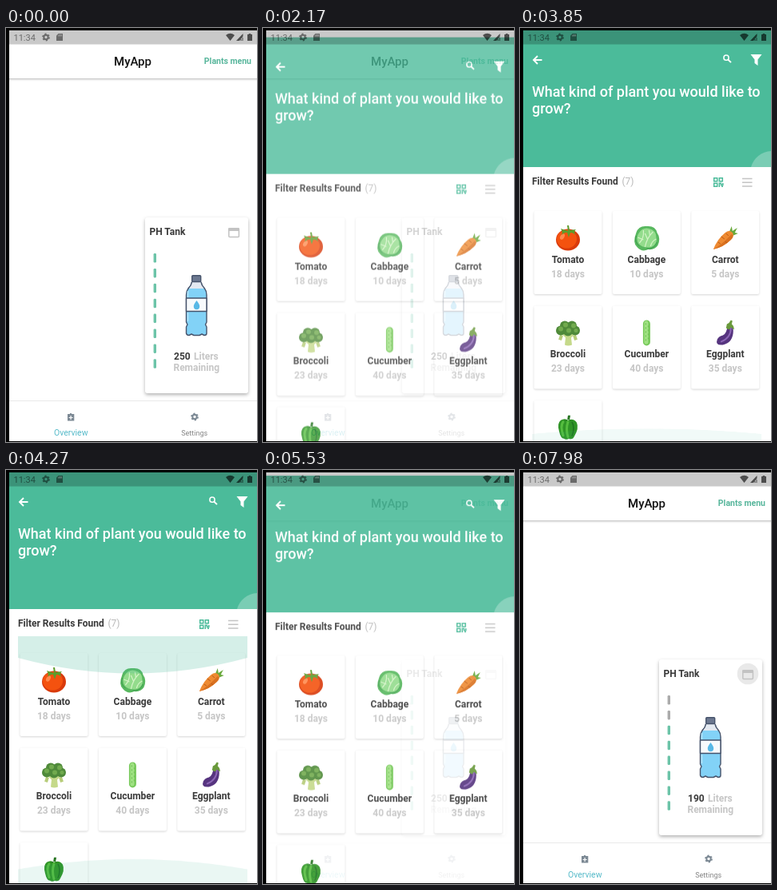
Animation, 314 px wide and 518 px high, one loop 8000 ms. Source, as an HTML page:

```html
<!DOCTYPE html>
<html lang="en">
<head>
<meta charset="utf-8">
<title>Plant app</title>
<style>
html, body { margin: 0; width: 100%; height: 100%; overflow: hidden; background: #000; }
svg { display: block; }
text { font-family: Roboto, "Noto Sans", sans-serif; font-size: 12px; fill: #3a3a3a; }
.b { font-weight: 700; }
.mid { text-anchor: middle; }
.soft { fill: #c6c6c6; }
.card { fill: #fff; filter: drop-shadow(0 1px 1px rgba(0, 0, 0, .16)); }
.tank { fill: #fff; filter: drop-shadow(0 2px 2px rgba(0, 0, 0, .3)); }
.bar { fill: #fff; filter: drop-shadow(0 1px 1.5px rgba(0, 0, 0, .3)); }

#plants { opacity: 0; animation: page 8s linear infinite; }
#items { animation: nudge 8s step-end infinite; }
.glow { fill: #4bbb9a; fill-opacity: .23; }
#top { animation: top 8s ease-in-out infinite; }
#bottom { animation: bottom 8s ease-in-out infinite; }
#ripple { animation: ripple 8s step-end infinite; }
.n { opacity: 0; animation: 8s step-end infinite; }
.n1 { animation-name: n1; }
.n2 { animation-name: n2; }
.n3 { animation-name: n3; }
.n4 { animation-name: n4; }
.dash { fill: #6cc4a8; }
.dash0 { animation: dash0 8s step-end infinite; }
.dash1 { animation: dash1 8s step-end infinite; }

@keyframes page {
  0%, 24.6% { opacity: 0; transform: translateY(40px); animation-timing-function: cubic-bezier(.3, .1, .25, 1); }
  29.75% { opacity: 1; transform: none; }
  68.2% { opacity: 1; transform: none; animation-timing-function: ease-in; }
  71.75%, 100% { opacity: 0; transform: translateY(40px); }
}
@keyframes nudge {
  0% { transform: none; }
  65.625% { transform: translateY(-1px); }
}
@keyframes top {
  0%, 39% { transform: scaleY(0); opacity: 0; }
  43.75% { transform: scaleY(.9); opacity: .9; }
  48.125%, 50.75% { transform: scaleY(0); opacity: 0; }
  53.375%, 54.25% { transform: scaleY(1); opacity: 1; }
  58.75%, 60.5% { transform: scaleY(0); opacity: 0; }
  63.875% { transform: scaleY(1); opacity: 1; animation-timing-function: linear; }
  67.375% { transform: scaleY(.31); opacity: .5; }
  68.25%, 100% { transform: scaleY(0); opacity: 0; }
}
@keyframes bottom {
  0%, 46.375% { transform: scaleY(0); opacity: 0; }
  50.75% { transform: scaleY(1); opacity: 1; animation-timing-function: linear; }
  53.375% { transform: scaleY(.65); opacity: .5; animation-timing-function: linear; }
  56%, 57% { transform: scaleY(0); opacity: 0; }
  60% { transform: scaleY(.9); opacity: .9; }
  63.875%, 100% { transform: scaleY(0); opacity: 0; }
}
@keyframes ripple {
  0% { opacity: 0; }
  88.375% { opacity: 1; }
  89.25% { opacity: 0; }
  95.375% { opacity: 1; }
  96.25% { opacity: 0; }
  99.75%, 100% { opacity: 1; }
}
@keyframes n1 { 0% { opacity: 1; } 88.375%, 100% { opacity: 0; } }
@keyframes n2 { 0% { opacity: 0; } 88.375% { opacity: 1; } 95.375%, 100% { opacity: 0; } }
@keyframes n3 { 0% { opacity: 0; } 95.375% { opacity: 1; } 99.75%, 100% { opacity: 0; } }
@keyframes n4 { 0% { opacity: 0; } 99.75%, 100% { opacity: 1; } }
@keyframes dash0 { 0% { fill: #6cc4a8; } 88.375%, 100% { fill: #ababab; } }
@keyframes dash1 { 0% { fill: #6cc4a8; } 95.375%, 100% { fill: #ababab; } }
</style>
</head>
<body>
<svg width="314" height="518" viewBox="0 0 314 518">
  <defs>
    <clipPath id="screen"><rect x="4" y="3" width="310" height="514"/></clipPath>
    <clipPath id="list"><rect x="15" y="208" width="287" height="309"/></clipPath>
    <g id="gear">
      <circle r="2.7" fill="none" stroke="currentColor" stroke-width="2"/>
      <circle r="4.1" fill="none" stroke="currentColor" stroke-width="1.6" stroke-dasharray="2.15"/>
    </g>

    <g id="tomato">
      <ellipse cy="2" rx="15" ry="13.5" fill="#d93a0b"/>
      <ellipse cx="-1.5" cy="1" rx="12.5" ry="11.5" fill="#f4520f"/>
      <ellipse cx="-7" cy="-2" rx="2.5" ry="4" transform="rotate(30 -7 -2)" fill="#ff8a4d"/>
      <path d="M0-9L-9-12Q-6-7-8-4Q-3-8-1-7L1-1L3-7Q7-7 9-4Q7-9 10-11L2-10L1-16H-1Z" fill="#5d9c2c"/>
    </g>
    <g id="cabbage">
      <path d="M-13-7Q-10-16 0-15Q11-16 13-7Q18 0 14 9Q10 15 2 14Q-6 18-12 11Q-18 6-13-7Z" fill="#58b85f"/>
      <path d="M-10-6Q-5-14 3-12Q12-10 12-1Q14 7 6 11Q-4 13-10 7Q-14 0-10-6Z" fill="#93dc8c"/>
      <path d="M-9 6Q-3 0-4-10M-2 11Q0 0 8-8M5 10Q6 4 12 1M-4 2L-11-1M1 1L-2-6M4-4L3-10" fill="none" stroke="#d5f4c8" stroke-width="1.2"/>
      <path d="M-13-3Q-16 5-9 10M0 13Q10 14 13 5" fill="none" stroke="#3f9f50" stroke-width="1"/>
    </g>
    <g id="carrot">
      <path d="M5-8L8-15L9-9L15-13L12-7L16-6L9-3Z" fill="#69a93c"/>
      <path d="M-15 14Q-10 1 0-7Q5-11 9-7Q12-3 7 2Q-2 11-15 14Z" fill="#ee8a32"/>
      <path d="M-15 14Q-4 8 8-5Q12-3 7 2Q-2 11-15 14Z" fill="#d97120"/>
      <path d="M-5-2L-1 1M-9 5L-6 7M1-6L4-3M2 6L0 4" stroke="#b95a14" stroke-width="1"/>
    </g>
    <g id="broccoli">
      <path d="M-9 0L-3 6L-4 15Q0 17 5 15L4 6L10 0Z" fill="#c5d98a"/>
      <path d="M-8 3L-10 9M8 3L10 9" stroke="#b6cc78" stroke-width="4"/>
      <g fill="#4f8a3a">
        <circle cx="-9" cy="-3" r="6"/><circle cx="9" cy="-3" r="6"/><circle cx="-4" cy="-9" r="6"/>
        <circle cx="5" cy="-9" r="6"/><circle cy="-2" r="6"/>
      </g>
      <g fill="#71aa4e">
        <circle cx="-9" cy="-5" r="3"/><circle cx="7" cy="-9" r="3"/><circle cx="-3" cy="-10" r="3"/>
        <circle cx="1" cy="-3" r="3"/><circle cx="10" cy="-3" r="2.5"/>
      </g>
    </g>
    <g id="cucumber">
      <rect x="-4.5" y="-16" width="9" height="32" rx="4.5" fill="#77c95a"/>
      <rect x="-3" y="-15" width="5" height="29" rx="2.5" fill="#a0e283"/>
      <path d="M-1-12V12M2-9V10" stroke="#6dbb52" stroke-width="1" stroke-dasharray="2 3"/>
    </g>
    <g id="eggplant">
      <path d="M3-10Q10-10 10-3Q10 12-3 15Q-13 16-10 8Q-8 4-3 3Q2 1 3-10Z" fill="#56347f"/>
      <path d="M7-6Q7 6-5 11" fill="none" stroke="#8b65b5" stroke-width="2" stroke-linecap="round"/>
      <path d="M1-6L2-11Q5-12 7-16L9-15L8-11Q11-9 11-4L7-7L5-4Z" fill="#6a9a3c"/>
    </g>
    <g id="pepper">
      <path d="M0-9Q-4-12-9-9Q-14-5-11 5Q-9 14-5 14Q-2 16 1 14Q6 16 8 11Q14 1 11-6Q7-12 0-9Z" fill="#2f9426"/>
      <path d="M-6-7Q-10-2-6 10M0-7Q-3 2 0 12" fill="none" stroke="#55bd3f" stroke-width="3" stroke-linecap="round"/>
      <path d="M5-7Q9 0 5 11" fill="none" stroke="#1d7220" stroke-width="1.5"/>
      <path d="M-5-8Q0-12 5-8L2-9L3-15H0L-1-9Z" fill="#267421"/>
    </g>
  </defs>

  <rect width="314" height="518"/>
  <g clip-path="url(#screen)">
    <g id="home">
      <rect x="4" y="3" width="310" height="514" fill="#fff"/>
      <rect class="bar" x="0" y="3" width="320" height="60"/>
      <text class="mid" x="158.5" y="47" style="font-size:15px;font-weight:500;fill:#111">MyApp</text>
      <text class="b" x="307" y="45" text-anchor="end" style="font-size:10.5px;fill:#58b69c">Plants menu</text>

      <rect class="tank" x="174" y="237" width="129" height="220" rx="3"/>
      <text class="b" x="179.5" y="259">PH Tank</text>
      <circle id="ripple" cx="285" cy="255" r="13.3" fill="#e9e9e9"/>
      <rect x="278.8" y="250.8" width="12.6" height="10.6" rx="1" fill="none" stroke="#c3c3c3" stroke-width="1.5"/>
      <path d="M278 250.5H292V254H278Z" fill="#c3c3c3"/>
      <g id="dashes"></g>

      <g stroke="#46536b" stroke-width="1.4" stroke-linejoin="round">
        <path d="M232.5 318Q232 322 228 326Q225.500 329 225.500 334V368L227 371L225.500 374V382Q226 384.500 229 384.500L232 383L235 384.500H242L245 383L248 384.500Q251 384.500 251 382V374L249.500 371L251 368V334Q251 329 248.500 326Q244.500 322 244 318Z" fill="#82d2f7"/>
        <path d="M232.500 318Q232 322 228 326H248.500Q244.500 322 244 318Z" fill="#e3e9f1" stroke="none"/>
        <path d="M232.500 318Q232 322 228 326M244 318Q244.500 322 248.500 326" fill="none"/>
        <rect x="225.500" y="338" width="25.500" height="16.500" fill="#f7fafc"/>
        <rect x="232.700" y="309.700" width="11" height="7.800" rx="1" fill="#6c7890"/>
      </g>
      <path d="M227.500 329V337M227.500 356V367" stroke="#b8e7fc" stroke-width="1.500"/>
      <path d="M238.500 341Q242.500 346 242.200 348.500A3.700 3.700 0 0 1 234.800 348.500Q234.500 346 238.500 341Z" fill="#58b8e6"/>

      <g class="b">
        <text class="n n1" x="210" y="415">250</text>
        <text class="n n2" x="210" y="415">230</text>
        <text class="n n3" x="210" y="415">210</text>
        <text class="n n4" x="210" y="415">190</text>
        <text class="soft" x="235" y="415">Liters</text>
        <text class="soft mid" x="238.300" y="429">Remaining</text>
      </g>

      <path d="M4 466.500H314" stroke="#e9e9e9"/>
      <path d="M77 483H79.700Q81 480.500 82.300 483H85.300V491.500H77Z" fill="#7c8994"/>
      <path d="M81.100 485V490M78.600 487.500H83.600" stroke="#fff" stroke-width="1.200"/>
      <text class="mid" x="81.300" y="510" style="font-size:10.500px;fill:#55bac9">Overview</text>
      <use href="#gear" x="236" y="486.500" color="#7c8994"/>
      <text class="mid" x="235.700" y="510" style="font-size:9px;fill:#858585">Settings</text>
    </g>

    <g id="plants">
      <rect x="4" y="3" width="310" height="514" fill="#fff"/>
      <rect x="4" y="3" width="310" height="171" fill="#4bbb9a"/>
      <path d="M289 174A27 27 0 0 1 314 154V174Z" fill="#7acdb4"/>
      <path d="M27.500 40H17.500M22 35L17 40L22 45" fill="none" stroke="#fff" stroke-width="1.900"/>
      <circle cx="258" cy="37.200" r="3.100" fill="none" stroke="#fff" stroke-width="1.500"/>
      <path d="M260.200 39.500L264 43.200" stroke="#fff" stroke-width="1.800"/>
      <path d="M288.500 33H302.500L297.500 39.500V47L293.500 44V39.500Z" fill="#fff"/>
      <g style="font-weight:500">
        <text x="15" y="86" style="font-size:18px;fill:#fff">What kind of plant you would like to</text>
        <text x="15" y="107" style="font-size:18px;fill:#fff">grow?</text>
      </g>
      <text class="b" x="15" y="196">Filter Results Found</text>
      <text x="127.500" y="196" style="fill:#b9b9b9">(7)</text>
      <g fill="none" stroke="#4bbb9a" stroke-width="1.500">
        <path d="M242.700 187.700H246.700V191.700H242.700ZM249.300 187.700H253.300V191.700H249.300ZM242.700 194.300H246.700V198.300H242.700Z"/>
        <path d="M249.300 199V194.300H251.500V196.500H253.800V194M252 198.300H254"/>
      </g>
      <path d="M278 188.500H290.500M278 193.300H290.500M278 198H290.500" stroke="#c4c4c4" stroke-width="1.600"/>
      <g clip-path="url(#list)">
        <g id="items"></g>
        <g transform="translate(15 208)"><path id="top" class="glow" d="M0 0H287V27Q143.500 66 0 27Z"/></g>
        <g transform="translate(15 517)"><path id="bottom" class="glow" d="M0 0H287V-27Q143.500-66 0-27Z"/></g>
      </g>
    </g>

    <rect x="4" y="3" width="310" height="17.500" fill-opacity=".21"/>
    <g opacity=".47">
      <text x="9.500" y="16" style="font-size:11px;fill:#000">11:34</text>
      <use href="#gear" x="50" y="11.500"/>
      <path d="M65.500 7H71V16H63V9.500Z"/>
    </g>
    <path d="M65.700 8.500V10.500M67.500 8V10.500M69.300 8V10.500" stroke="#fff" stroke-opacity=".5" stroke-width=".8"/>
    <g fill-opacity=".62">
      <path d="M275 9Q280.500 4.500 286 9L280.500 16Z"/>
      <path d="M288 16L296.500 7V10.500L292 16ZM293.500 14H294.500V16H293.500ZM295.500 12H296.500V16H295.500Z"/>
      <path d="M302 8H303.700V7H306.300V8H308V16H302Z"/>
    </g>
  </g>
</svg>
<script>
const items = [
  ["tomato", "Tomato", 18], ["cabbage", "Cabbage", 10], ["carrot", "Carrot", 5],
  ["broccoli", "Broccoli", 23], ["cucumber", "Cucumber", 40], ["eggplant", "Eggplant", 35],
  ["pepper"]
];
const byId = id => document.getElementById(id);

byId("items").innerHTML = items.map(([icon, name, days], i) => {
  const x = 60 + (i % 3) * 98.4, y = 229 + Math.floor(i / 3) * 118.4;
  const label = name
    ? `<text class="b mid" x="${x}" y="${y + 65}">${name}</text>
       <text class="b mid soft" x="${x}" y="${y + 83}">${days} days</text>`
    : "";
  return `<rect class="card" x="${x - 42.5}" y="${y}" width="85" height="104" rx="2"/>
    <use href="#${icon}" x="${x}" y="${y + 34}"/>${label}`;
}).join("");

byId("dashes").innerHTML = Array.from({ length: 8 }, (_, i) =>
  `<rect class="dash dash${i}" x="184.600" y="${282 + i * 18.9}" width="3.400" height="11.500" rx="1.300"/>`
).join("");
</script>
</body>
</html>
```
